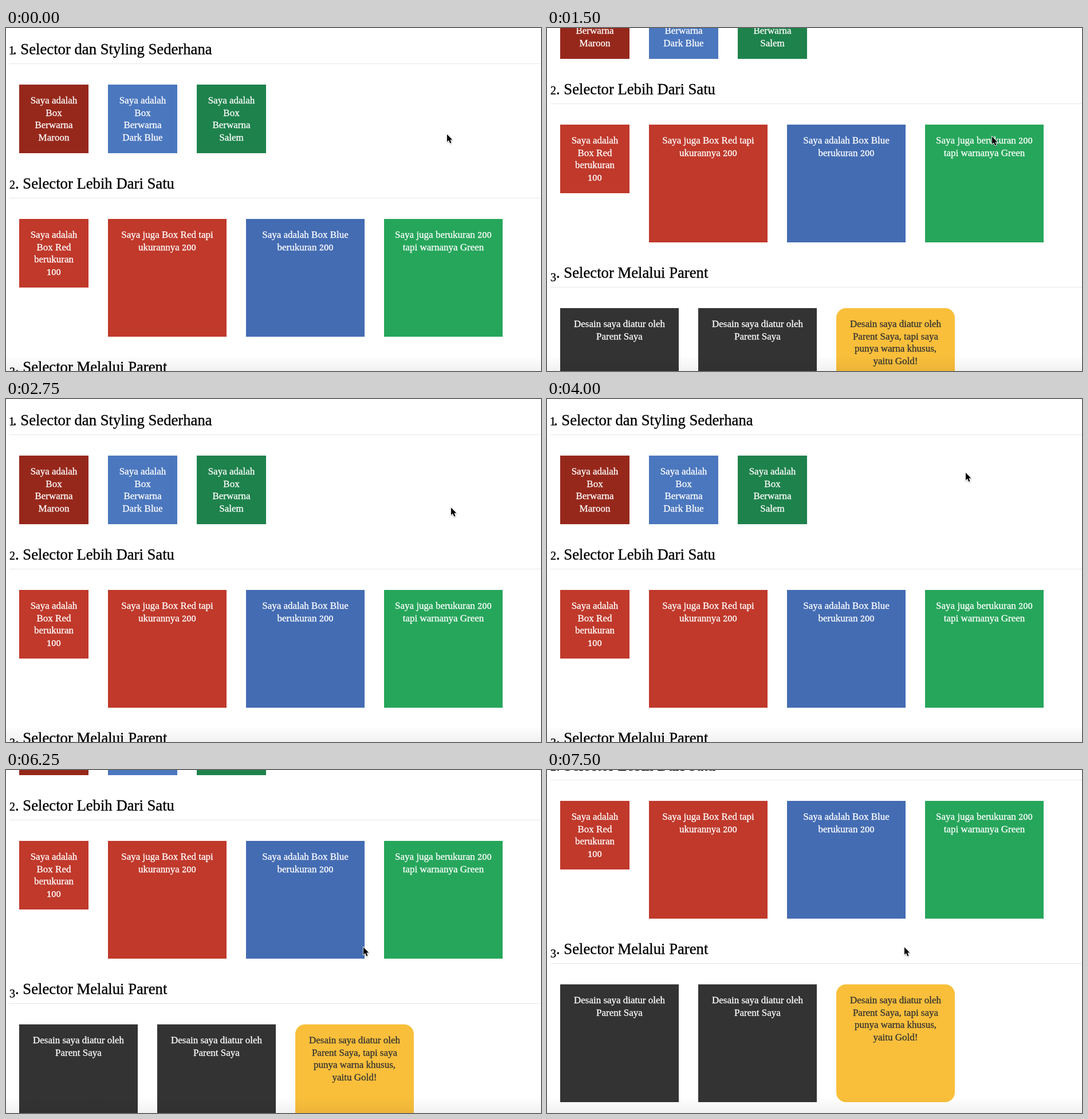
Animation of 934 by 600 pixels, one loop 8000 ms. Source, as an HTML page:

```html
<!DOCTYPE html>
<html lang="id">
<head>
<meta charset="utf-8">
<title>CSS Selector</title>
<style>
html, body { margin: 0; width: 100%; height: 100%; overflow: hidden; background: #fff; }
#stage { position: relative; width: 934px; height: 600px; overflow: hidden; background: #fff; }
#page { position: absolute; left: 0; top: 0; width: 934px; height: 900px; font-family: "Liberation Serif", serif; }
section { position: absolute; left: 0; width: 100%; }
h2 {
  position: absolute; left: 6px; top: 22px; right: 0; height: 40px; margin: 0;
  border-bottom: 1px solid #e7e7e7; color: #000; white-space: nowrap;
  font-size: 26.7px; font-weight: 400; line-height: 30px; -webkit-text-stroke: .35px;
}
h2 b { font-size: .75em; font-weight: 400; line-height: 0; }
h2 .one { letter-spacing: -4px; margin-left: -1px; margin-right: 1px; }
h2 .three { vertical-align: -6px; }
.box {
  position: absolute; top: 98.8px; box-sizing: border-box; padding-top: 17.2px;
  color: #fff; text-align: center; white-space: pre;
  font-size: 17px; line-height: 21.6px; -webkit-text-stroke: .3px;
}
.box b { font: 400 .87em "Noto Serif", serif; line-height: 0; }
.gold { color: #333; border-radius: 17px; }
#shade {
  position: absolute; left: 0; right: 0; bottom: 0; height: 28px;
  background: linear-gradient(rgba(0,0,0,0), rgba(0,0,0,.055));
}
#cursor { position: absolute; left: 0; top: 0; overflow: visible; filter: drop-shadow(0 1px 1px rgba(0,0,0,.3)); }
</style>
</head>
<body>
<div id="stage">
  <div id="page"></div>
  <div id="shade"></div>
  <svg id="cursor" width="12" height="18">
    <path d="M0 0V13L3 10.3L5.3 15.6L7.5 14.7L5.3 9.4H9.3Z" fill="#000" stroke="#fff" stroke-width="1.6" paint-order="stroke"/>
  </svg>
</div>
<script>
const SMALL = 120.6, BIG = 206.6, GAP = 34.4;

// each box: size, colour, text, extra class
const sections = [
  { top: 0, num: 'one">1', title: 'Selector dan Styling Sederhana', boxes: [
    [SMALL, '#96281b', 'Saya adalah\nBox\nBerwarna\nMaroon'],
    [SMALL, '#4b77be', 'Saya adalah\nBox\nBerwarna\nDark Blue'],
    [SMALL, '#1e824c', 'Saya adalah\nBox\nBerwarna\nSalem']] },
  { top: 235, num: 'two">2', title: 'Selector Lebih Dari Satu', boxes: [
    [SMALL, '#c0392b', 'Saya adalah\nBox Red\nberukuran\n100'],
    [BIG, '#c0392b', 'Saya juga Box Red tapi\nukurannya 200'],
    [BIG, '#446cb3', 'Saya adalah Box Blue\nberukuran 200'],
    [BIG, '#26a65b', 'Saya juga berukuran 200\ntapi warnanya Green']] },
  { top: 556, num: 'three">3', title: 'Selector Melalui Parent', boxes: [
    [BIG, '#333', 'Desain saya diatur oleh\nParent Saya'],
    [BIG, '#333', 'Desain saya diatur oleh\nParent Saya'],
    [BIG, '#f9bf3b', 'Desain saya diatur oleh\nParent Saya, tapi saya\npunya warna khusus,\nyaitu Gold!', 'gold']] }
];

function rowHTML(boxes) {
  let x = 23.2;
  return boxes.map(([size, color, text, cls = '']) => {
    const label = text.replace(/\d+/g, '<b>$&</b>');
    const html = `<div class="box ${cls}" style="left:${x}px;width:${size}px;height:${size}px;background:${color}">${label}</div>`;
    x += size + GAP;
    return html;
  }).join('');
}

const page = document.getElementById('page');
const cursor = document.getElementById('cursor');
page.innerHTML = sections.map(s =>
  `<section style="top:${s.top}px"><h2><b class="${s.num}</b>. ${s.title}</h2>${rowHTML(s.boxes)}</section>`).join('');

// hard steps: [start ms, value]
const LOOP = 8000;
const scrollSteps = [[0, 0], [1000, 5], [1250, 70], [1500, 165], [2000, 280], [2750, 0],
  [6000, 110], [6250, 210], [6750, 240], [7000, 280]];
const cursorSteps = [[0, [770, 186]], [500, [777, 190]], [3250, [735, 165]], [3500, [736, 165]],
  [4000, [731, 129]], [4250, [297, 15]], [4500, [210, 193]], [4750, [517, 206]], [5000, [479, 82]],
  [5250, [548, 159]], [5500, [630, 183]], [5750, [624, 262]], [6000, [624, 310]]];

const at = (steps, t) => steps.filter(s => s[0] <= t).pop()[1];

const start = performance.now();
function draw() {
  const t = Math.max(0, performance.now() - start) % LOOP;
  page.style.top = -at(scrollSteps, t) + 'px';
  const [x, y] = at(cursorSteps, t);
  cursor.style.left = x + 'px';
  cursor.style.top = y + 'px';
  requestAnimationFrame(draw);
}
draw();
</script>
</body>
</html>
```
